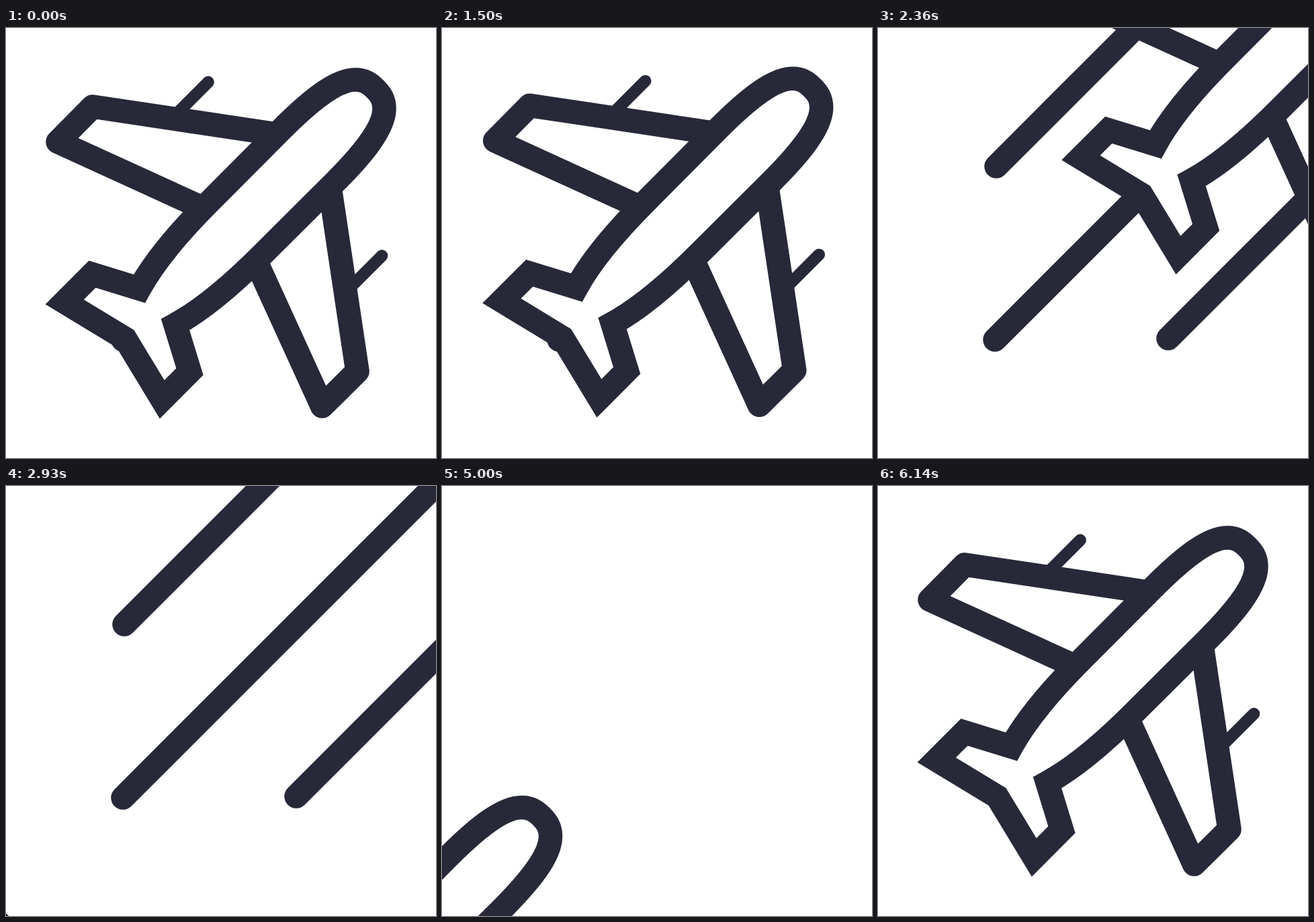
An HTML page for the animation above (6.43 s loop, 640 by 640 pixels).

```html
<!DOCTYPE html>
<html lang="en">
<head>
<meta charset="utf-8">
<title>Plane</title>
<style>
  html, body { margin: 0; width: 100%; height: 100%; overflow: hidden; background: #fff; }
  svg { display: block; width: 100vw; height: 100vh; }
  .ink { fill: none; stroke: #282938; stroke-width: 35.56; }
  .thin { stroke-width: 17.8; stroke-linecap: round; }
  .solid { fill: #fff; }
</style>
</head>
<body>
<svg viewBox="0 0 640 640">
  <g id="trails" class="ink" stroke-linecap="round"></g>
  <g id="plane" class="ink">
    <g id="wing">
      <path class="thin" d="M252 129.5L301 80.5"/>
      <path class="solid" stroke-linejoin="round" d="M403 158L129 117L77 169.4L293 268"/>
    </g>
    <use href="#wing" transform="matrix(0 -1 -1 0 640 640)"/>
    <path class="solid" stroke-miterlimit="10" d="M177.5 462.5L87.2 407.7L128.5 366.5L198.5 388
      C221 347 262 299.5 302 259.5L410 151C450 111 490 77 520 77C534 77 542 83 549.5 90.5
      C557 98 563 106 563 120C563 150 529 190 489 230L380.5 338
      C340.5 378 293 419 252 441.5L273.5 511.5L232.3 552.8Z"/>
  </g>
</svg>
<script>
  const LOOP = 6430, STEP = 1000 / 14, FPS = 25;
  const BACK = -36, AWAY = 561, BELOW = -560;
  // Seconds
  const TURN = .88, GONE = 2.88, ENTER = 4.88, REST = 6.13;
  const TRAIL_STARTS = [[176, 206], [174, 464], [432, 462]];
  // Steps at which the trails get visibly fainter
  const FADE_STEPS = [44, 49, 52, 57, 62, 65, 68];

  const plane = document.getElementById('plane');
  const trails = document.getElementById('trails');
  const lines = TRAIL_STARTS.map(() =>
    trails.appendChild(document.createElementNS('http://www.w3.org/2000/svg', 'path')));

  const smooth = s => s * s * (3 - 2 * s);

  // cubic-bezier(.78, 0, 1, 1)
  function easeIn(x) {
    let lo = 0, hi = 1;
    for (let i = 0; i < 30; i++) {
      const s = (lo + hi) / 2;
      if (2.34 * s * (1 - s) ** 2 + smooth(s) < x) lo = s; else hi = s;
    }
    return smooth(lo);
  }

  // Distance travelled along the up-right diagonal
  function shiftAt(sec) {
    if (sec <= TURN) return BACK * smooth(sec / TURN);
    if (sec <= GONE) return BACK + (AWAY - BACK) * easeIn((sec - TURN) / (GONE - TURN));
    if (sec <= ENTER) return BELOW;
    if (sec < REST) return BELOW * easeIn((REST - sec) / (REST - ENTER));
    return 0;
  }

  function stepAt(ms) {
    const n = Math.floor((ms + 5) / STEP);
    return Math.round(n * STEP / 10) * 10 > ms ? n - 1 : n;
  }

  // Each step shows the nearest picture of a 25 fps clock
  const secondsAt = n => Math.round(n * FPS / 14) / FPS;

  function opacityAt(n) {
    const last = FADE_STEPS.filter(s => s <= n).pop() || 0;
    const faded = (secondsAt(last) - GONE) / (ENTER - GONE);
    return last === FADE_STEPS[FADE_STEPS.length - 1] ? 0 : 1 - Math.max(0, faded);
  }

  function draw(ms) {
    const n = stepAt(ms), sec = secondsAt(n), d = shiftAt(sec);
    const length = (sec <= GONE ? d : AWAY) - BACK;
    plane.setAttribute('transform', `translate(${d} ${-d})`);
    lines.forEach((line, i) => {
      const [x, y] = TRAIL_STARTS[i];
      line.setAttribute('d', `M${x} ${y}L${x + length} ${y - length}`);
    });
    trails.setAttribute('opacity', opacityAt(n));
  }

  const start = performance.now();
  function tick(now) {
    draw(Math.max(0, now - start) % LOOP);
    requestAnimationFrame(tick);
  }
  draw(0);
  requestAnimationFrame(tick);
</script>
</body>
</html>
```
